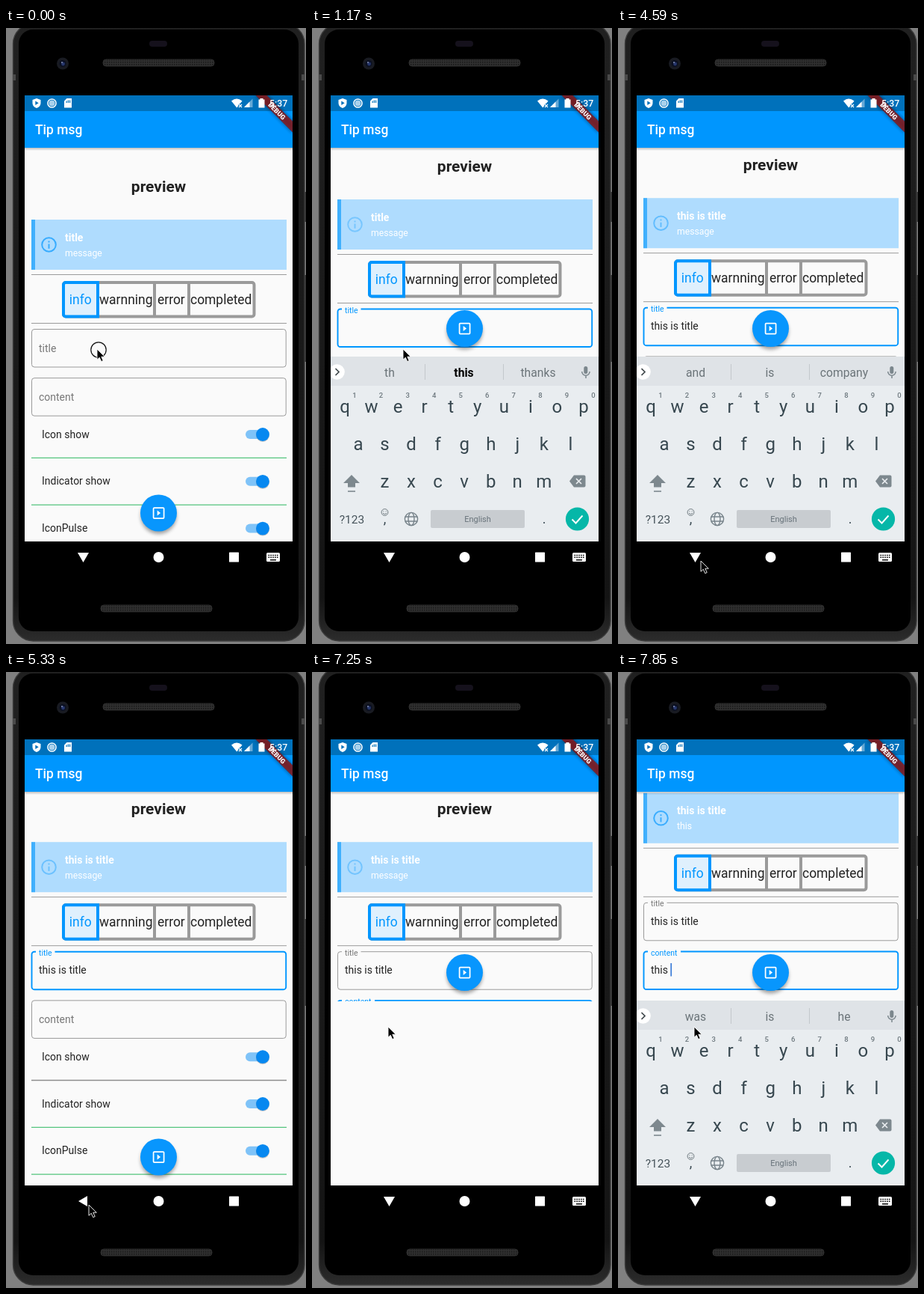
These frames come from a looping animation (402x823 px, 8 s). An HTML page:

```html
<!DOCTYPE html>
<html lang="en">
<head>
<meta charset="utf-8">
<title>Tip msg preview</title>
<style>
  html, body { margin: 0; width: 100%; height: 100%; overflow: hidden; background: #808080; }
  svg { display: block; width: 402px; height: 823px; font-family: Roboto, sans-serif; }
  text { white-space: pre; }
  .mid { text-anchor: middle; }
  .body { font-size: 13.97px; fill: #222; }
  .hint { fill: #777; }
  .label { font-size: 10.5px; }
  .group { font-size: 17.46px; fill: #222; }
  .rule { stroke: #9b9b9b; stroke-width: 1; }
  .key { font-size: 24px; fill: #37474f; text-anchor: middle; }
  .digit { font-size: 9.5px; font-weight: 500; fill: #6d787e; text-anchor: middle; }
  .sug { font-size: 15.7px; fill: #6b7479; text-anchor: middle; }
  .sug.best { font-weight: 700; fill: #000; }
</style>
</head>
<body>
<svg viewBox="0 0 402 823">
  <defs>
    <clipPath id="screen"><rect x="25" y="90" width="359" height="596"/></clipPath>
    <clipPath id="bodyClip"><rect id="bodyBox" x="25" y="160" width="359" height="526"/></clipPath>
    <filter id="soft" x="-30%" y="-30%" width="160%" height="170%"><feGaussianBlur stdDeviation="2.4"/></filter>
    <pattern id="mesh" width="3" height="3" patternUnits="userSpaceOnUse">
      <rect width="3" height="3" fill="#303030"/><rect width="1.5" height="1.5" fill="#161616"/>
    </pattern>
    <linearGradient id="shell" x2="0" y2="1">
      <stop offset="0" stop-color="#202020"/><stop offset=".93" stop-color="#141414"/><stop offset="1" stop-color="#2c2c2c"/>
    </linearGradient>
    <linearGradient id="drop" x2="0" y2="1">
      <stop offset="0" stop-color="#000" stop-opacity=".24"/><stop offset="1" stop-color="#000" stop-opacity="0"/>
    </linearGradient>
    <g id="switch">
      <rect x="321" y="-6" width="30" height="12" rx="6" fill="#7fc3f8"/>
      <circle cx="344" cy="1" r="9" opacity=".2"/>
      <circle cx="344" r="8.9" fill="#0788f0"/>
    </g>
  </defs>

  <!-- phone -->
  <rect width="402" height="823" fill="#808080"/>
  <path d="M400 219h2v40h-2zM400 330h2v116h-2z" fill="#333"/>
  <rect x="9.5" y="-6" width="390.5" height="825" rx="27" fill="url(#shell)" stroke="#3c3c3c" stroke-width="1.4"/>
  <path d="M9 62h4v8H9zM396 62h4v8h-4z" fill="#4a4a4a"/>
  <rect x="17" y="2" width="375" height="804" rx="19" fill="#000"/>
  <rect x="192" y="17" width="24" height="8" rx="4" fill="#15111c"/>
  <circle cx="76" cy="47.500" r="8" fill="#191b22"/>
  <circle cx="76" cy="47.500" r="4.500" fill="#0b1022"/>
  <circle cx="76.500" cy="48" r="2.400" fill="#27376c"/>
  <circle cx="75" cy="46" r="1" fill="#8590b5"/>
  <rect x="130" y="42" width="149" height="9" rx="4" fill="url(#mesh)" stroke="#2d2d2d"/>
  <rect x="127" y="771" width="149" height="9" rx="4" fill="url(#mesh)" stroke="#2d2d2d"/>

  <g clip-path="url(#screen)">
    <rect x="25" y="90" width="359" height="596" fill="#fafafa"/>

    <g clip-path="url(#bodyClip)">
      <g id="list">
        <text x="204.500" y="219" class="mid" font-size="20.950" font-weight="700" fill="#222">preview</text>
        <rect x="34" y="256" width="342" height="67" fill="#afdcfe"/>
        <rect x="34" y="256" width="5" height="67" fill="#40b0fd"/>
        <g id="icon" fill="#0096ff">
          <circle cx="57.500" cy="289.500" r="9.300" fill="none" stroke="#0096ff" stroke-width="2"/>
          <path d="M56.500 284.400h2v2h-2zM56.500 288.500h2v6.200h-2z"/>
        </g>
        <text id="tipTitle" x="79" y="284.500" font-size="13.970" font-weight="700" fill="#fff"></text>
        <text id="tipMsg" x="79" y="304.700" font-size="12.220" fill="#fff"></text>
        <path class="rule" d="M34 329.500H376M34 394.500H376"/>

        <rect x="77" y="340" width="255.500" height="45.500" rx="3" fill="none" stroke="#9a9a9a" stroke-width="4"/>
        <path d="M199 340v45M245 340v45" stroke="#9a9a9a" stroke-width="4"/>
        <path d="M123 340V385.500H80a3 3 0 0 1-3-3V343a3 3 0 0 1 3-3z" fill="#dff0fd" stroke="#0096ff" stroke-width="4"/>
        <text x="84.800" y="369" class="group" style="fill:#0096ff">info</text>
        <text x="125" y="369" class="group">warnning</text>
        <text x="203" y="369" class="group">error</text>
        <text x="247" y="369" class="group">completed</text>

        <g id="fields"></g>
        <g id="rows"></g>
      </g>
    </g>

    <g id="fab">
      <circle cx="204.500" cy="652" r="24" opacity=".36" filter="url(#soft)"/>
      <circle cx="204.500" cy="648" r="24.500" fill="#0896fd"/>
      <rect x="197.600" y="641" width="14" height="14" rx="1" fill="none" stroke="#fff" stroke-width="1.750"/>
      <path d="M202.700 644.500v7l4.400-3.500z" fill="#fff"/>
    </g>

    <!-- bars -->
    <rect x="25" y="160" width="359" height="4" fill="url(#drop)"/>
    <rect x="25" y="111" width="359" height="49" fill="#0096fe"/>
    <text x="39" y="142" font-size="17.460" font-weight="500" fill="#fff">Tip msg</text>
    <rect x="25" y="90" width="359" height="21" fill="#0071bb"/>
    <g transform="translate(384 90) rotate(45)">
      <rect x="-34.900" y="24.400" width="69.800" height="10.500" opacity=".5" filter="url(#soft)"/>
      <rect x="-34.900" y="24.400" width="69.800" height="10.500" opacity=".45"/>
      <rect x="-34.900" y="24.400" width="69.800" height="10.500" fill="#b71c1c" opacity=".63"/>
      <text class="mid" y="32.800" font-size="8.900" font-weight="900" fill="#fff">DEBUG</text>
    </g>
    <g fill="#fff">
      <path d="M41 94l5.500 2v4c0 3.500-2.300 6-5.500 7-3.200-1-5.500-3.500-5.500-7v-4z"/>
      <path d="M39.300 97.500v5.500l4.400-2.750z" fill="#0071bb"/>
      <circle cx="61.500" cy="100.500" r="4" fill="#a9d1ec"/>
      <circle cx="61.500" cy="100.500" r="5.600" fill="none" stroke="#fff" stroke-width="1.500"/>
      <path d="M81.500 94H88v12.500H78V97.500z"/>
      <path d="M80.500 97.500h1.200v2.500h-1.200zM82.800 96.500H84v3.500h-1.200zM85 96.500h1.200v3.500H85z" fill="#0071bb"/>
      <path d="M302 97.500Q309 91.500 316.500 97.500L309.300 106.500z"/>
      <path d="M312 102l4 4m0-4l-4 4" stroke="#0071bb" stroke-width="3"/>
      <path d="M312 102l4 4m0-4l-4 4" stroke="#fff" stroke-width="1.200"/>
      <path d="M330.500 94.500V106H319z" opacity=".4"/>
      <path d="M326.500 98.500V106H319z"/>
      <path d="M338.500 95.500h2V94h4v1.500h2V106.500h-8z"/>
      <text x="353" y="105" font-size="12.300" font-weight="500">5:37</text>
    </g>

    <!-- keyboard -->
    <g id="keyboard">
      <rect x="25" y="439" width="359" height="250" fill="#e9edf0"/>
      <rect x="25" y="439" width="359" height="39" fill="#dfe3e7"/>
      <path d="M151.500 449v21M256.500 449v21" stroke="#c3c8cc"/>
      <circle cx="33.500" cy="459.500" r="10.300" fill="#fff"/>
      <path d="M31.500 455l4.500 4.500-4.500 4.500" fill="none" stroke="#40484c" stroke-width="1.700"/>
      <text class="sug" x="104" y="465.500"></text>
      <text class="sug" x="203.500" y="465.500"></text>
      <text class="sug" x="303" y="465.500"></text>
      <rect x="364.300" y="452" width="5" height="10" rx="2.500" fill="#7b868c"/>
      <path d="M361.700 459a5.200 5.200 0 0 0 10.400 0M367 464.500v3.500" fill="none" stroke="#7b868c" stroke-width="1.500"/>
      <g id="keys"></g>
      <path d="M53 597L64 608H58V613.500H48V608H42z" fill="#7d888e"/>
      <path d="M48 619h10" stroke="#7d888e" stroke-width="1.600"/>
      <path d="M351 597.500h13.500q2 0 2 2v12q0 2-2 2H351l-6-8z" fill="#7d888e"/>
      <path d="M354 602l7 7m0-7l-7 7" stroke="#e9edf0" stroke-width="1.700"/>
      <text x="53.500" y="661.500" class="mid" font-size="15.500" fill="#47545b">?123</text>
      <g fill="none" stroke="#6d787e">
        <circle cx="97.500" cy="647" r="4.400"/>
        <path d="M95 648.300q2.500 2.600 5 0M95.800 645.300v1M99.200 645.300v1"/>
        <g stroke="#77838a" stroke-width="1.400">
          <circle cx="133" cy="656" r="8.600"/><ellipse cx="133" cy="656" rx="4" ry="8.600"/>
          <path d="M125 653h16M125 659h16"/>
        </g>
      </g>
      <text x="97.500" y="661.500" class="mid" font-size="18" fill="#37474f">,</text>
      <rect x="159" y="644" width="126" height="24" rx="2" fill="#c8ccd0"/>
      <text x="222" y="660" class="mid" font-size="11" fill="#68737a">English</text>
      <text x="311" y="662" class="mid" font-size="18" fill="#37474f">.</text>
      <circle cx="355.500" cy="656" r="15.600" fill="#05b7a8"/>
      <path d="M348.500 656.500l5 5 9-10" fill="none" stroke="#fff" stroke-width="1.900"/>
    </g>
  </g>

  <!-- navigation -->
  <g fill="#fff">
    <path id="back"/>
    <circle cx="204.500" cy="707" r="7"/>
    <rect x="299" y="700.500" width="13" height="13" rx=".6"/>
    <g id="switcher">
      <rect x="349" y="701" width="18" height="12" rx="1.600"/>
      <path d="M351.500 704.500h13M351.500 707.300h13" stroke="#000" stroke-width="1.600" stroke-dasharray="1.600 1.250"/>
      <path d="M354 710.700h8" stroke="#000" stroke-width="1.500"/>
    </g>
  </g>

  <g id="mouse">
    <circle id="ring" cx="2" cy="1" r="10.200" fill="none" stroke="#111" stroke-width="1.200"/>
    <path d="M0 0V14.200L3.300 11.200 5.700 16.600 8.200 15.500 5.800 10.200H10.300z" stroke="#fff" stroke-width=".9"/>
  </g>
</svg>

<script>
const $ = id => document.getElementById(id);
const show = (el, on) => { el.style.display = on ? '' : 'none'; };
const shift = (el, x, y) => el.setAttribute('transform', `translate(${x} ${y})`);
const clamp = v => Math.max(0, Math.min(1, v));
const LOOP = 8000, BLUE = '#0096ff';

// Runs of redraws: first time, last time, count
const runs = [[0, 0, 1], [150, 440, 3], [730, 730, 1], [1170, 2070, 7], [2220, 3100, 7],
  [3390, 4290, 7], [4440, 5480, 8], [5630, 5920, 3], [6220, 6960, 6], [7250, 7850, 5]];
const ticks = runs.flatMap(([a, b, n]) =>
  Array.from({ length: n }, (_, i) => n > 1 ? a + Math.floor((b - a) * i / (n - 1) / 10) * 10 : a));

// Time, title, message, suggestions ("*" marks a composing word)
const typing = [
  [0, '', '', 'I the this'],
  [1170, '', '', '*th this thanks'],
  [1320, 'th', '', '*th this thanks'],
  [1470, 'thi', '', '*thi this think'],
  [1620, 'this', '', '*thus this thistle'],
  [1910, 'this ', '', 'is was one'],
  [2220, 'this i', '', '*i is in'],
  [2360, 'this is', '', '*is is isn’t'],
  [2500, 'this is ', '', 'the a not'],
  [2640, 'this is ', '', '*t the to'],
  [2790, 'this is t', '', '*ti to time'],
  [2940, 'this is ti', '', '*tit title tie'],
  [3100, 'this is tit', '', '*tit title titles'],
  [3390, 'this is titl', '', '*title title titles'],
  [3530, 'this is title', '', 'and is company'],
  [7250, 'this is title', '', 'I the this'],
  [7550, 'this is title', 'th', '*th this thanks'],
  [7700, 'this is title', 'this', '*this this thus'],
  [7850, 'this is title', 'this ', 'was is he']
];
const path = [[0, 122, 429], [3540, 122, 429], [4140, 111, 712], [5480, 111, 712],
  [5920, 100, 458], [6220, 102, 474], [8000, 102, 474]];
const clicks = [[0, 150], [4430, 4580], [6360, 6510]];
const within = (t, spans) => spans.some(([a, b]) => t >= a && t < b);

const pen = document.createElement('canvas').getContext('2d');
const textWidth = s => { pen.font = '13.97px Roboto, sans-serif'; return pen.measureText(s).width; };

function makeField(name, y, gap) {
  const g = document.createElementNS('http://www.w3.org/2000/svg', 'g');
  g.innerHTML = `<rect x="34.500" y="${y}" width="340.700" height="50.500" rx="3.500" fill="none"/>
    <rect x="40" y="${y - 2}" width="${gap}" height="4" fill="#fafafa"/>
    <text class="label" x="44" y="${y + 5.2}">${name}</text>
    <text class="body hint" x="44" y="${y + 30.2}">${name}</text>
    <text class="body" x="44" y="${y + 29.4}"></text>
    <rect y="${y + 15.5}" width="1.750" height="17.500" fill="#3f7fd8"/>`;
  $('fields').append(g);
  const [box, hole, label, hint, value, caret] = g.children;
  return (text, focus, blink) => {
    const up = focus || text !== '';
    box.setAttribute('stroke', focus ? BLUE : '#9a9a9a');
    box.setAttribute('stroke-width', focus ? 1.9 : 1);
    label.setAttribute('fill', focus ? BLUE : '#777');
    show(hole, up); show(label, up); show(hint, !up);
    value.textContent = text;
    caret.setAttribute('x', 44 + textWidth(text));
    show(caret, blink);
  };
}
const titleField = makeField('title', 402.5, 25.5);
const contentField = makeField('content', 467.7, 44);

$('rows').innerHTML = ['Icon show', 'Indicator show', 'IconPulse'].map((name, i) => {
  const y = 543 + 62.8 * i;
  return `<text class="body" x="48" y="${y + 4.6}">${name}</text>
    <use href="#switch" y="${y}"/>
    <path class="line" d="M34 ${y + 31.3}H376" stroke="#53c47d" stroke-width="1.300"/>`;
}).join('');
const firstLine = document.querySelector('.line');

$('keys').innerHTML = [['qwertyuiop', 44, 513.5], ['asdfghjkl', 62, 563.5], ['zxcvbnm', 97.5, 614]]
  .map(([row, x0, y], r) => [...row].map((c, i) => {
    const x = x0 + 35.55 * i;
    const digit = r ? '' : `<text class="digit" x="${x + 13}" y="494">${(i + 1) % 10}</text>`;
    return `<text class="key" x="${x}" y="${y}">${c}</text>${digit}`;
  }).join('')).join('');
const sugs = [...document.querySelectorAll('.sug')];

function mouseAt(t) {
  const i = path.findIndex(p => p[0] > t);
  const [a, x, y] = path[i - 1], [b, x2, y2] = path[i];
  const k = (t - a) / (b - a), e = k * k * (3 - 2 * k);
  return [x + (x2 - x) * e, y + (y2 - y) * e];
}

function draw(t) {
  const [, title, msg, words] = typing.findLast(s => s[0] <= t);
  const inset = within(t, [[150, 4720], [7250, LOOP]]);
  const onTitle = t >= 150 && t < 6510, onContent = t >= 6510;

  // Keyboard rises after the body has shrunk, and sinks on dismissal
  const rise = t >= 7250 ? clamp((t - 7250) / 250)
    : t < 4580 ? clamp((t - 150) / 250) : clamp((4860 - t) / 270);
  shift($('keyboard'), 0, 70 * (1 - rise) ** 2);
  $('keyboard').style.opacity = rise;
  const list = words.replace('*', '').split(' ');
  sugs.forEach((el, i) => { el.textContent = list[i]; });
  sugs[1].classList.toggle('best', words[0] === '*');

  const scroll = t < 150 ? 0 : t < 290 ? 14 : t < 1320 ? 27 : t < 7390 ? 28.8 : 94.2;
  shift($('list'), 0, -scroll);
  $('bodyBox').setAttribute('height', inset ? 280 : 526);
  shift($('fab'), 0, inset ? -246.5 : 0);

  const blink = within(t, [[290, 730], [1320, 4140]]);
  titleField(title, onTitle, blink && inset);
  contentField(msg, onContent, t >= 7390);
  $('tipTitle').textContent = title || 'title';
  $('tipMsg').textContent = msg || 'message';
  $('icon').style.opacity = 0.48 + 0.2 * Math.cos(Math.PI * t / 1000);
  firstLine.setAttribute('stroke', t < 4720 ? '#53c47d' : '#8c8c8c');

  const imeNav = within(t, [[0, 4720], [6510, LOOP]]);
  $('back').setAttribute('d', imeNav ? 'M96 701H111L103.500 714z' : 'M97 707L109 700V714z');
  show($('switcher'), imeNav);
  shift($('mouse'), ...mouseAt(t));
  show($('ring'), within(t, clicks));
}

const start = performance.now();
let shown = -1;
function frame() {
  const now = (performance.now() - start) % LOOP;
  const tick = ticks.findLast(v => v <= now);
  if (tick !== shown) draw(shown = tick);
  requestAnimationFrame(frame);
}
frame();
</script>
</body>
</html>
```
